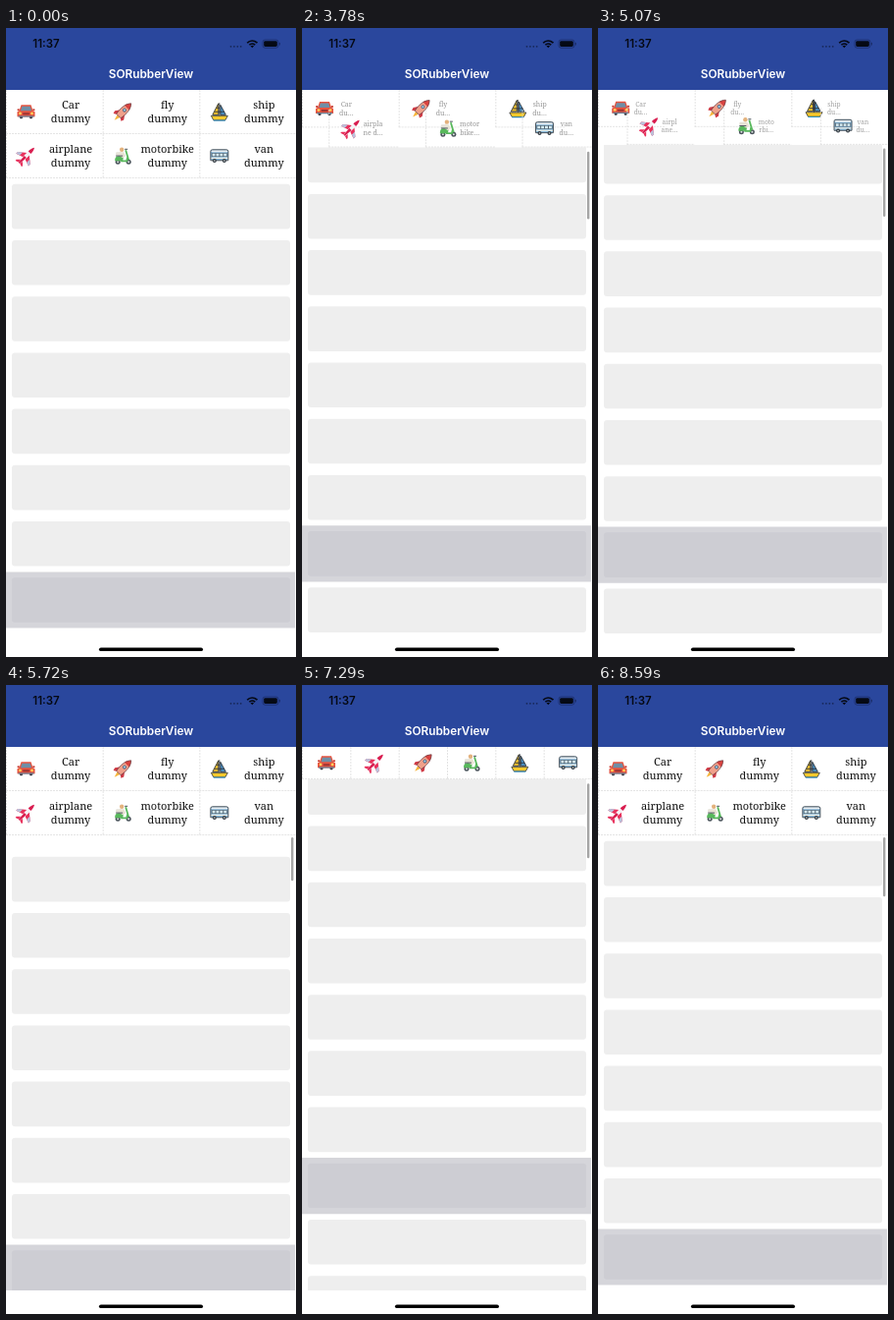
Write an HTML page with a canvas that moves like this. It is 296 px wide and 640 px high and loops after 8690 ms.

```html
<!DOCTYPE html>
<html lang="en">
<head>
<meta charset="utf-8">
<title>SORubberView</title>
<style>
  html, body { margin: 0; width: 100%; height: 100%; overflow: hidden; background: #fff; }
  canvas { display: block; width: 296px; height: 640px; }
</style>
</head>
<body>
<canvas id="stage"></canvas>
<script>
const W = 296, H = 640, LOOP = 8690;
const NAV = 63, OPEN = 90, SHUT = 33, BOTTOM = 616;
const ROW = 57.2, CONTENT = 3560;

const canvas = document.getElementById('stage');
const ctx = canvas.getContext('2d');
const dpr = window.devicePixelRatio || 1;
canvas.width = W * dpr;
canvas.height = H * dpr;

// [time, scroll distance, header collapse 0..1]
const keys = [
  [3200, 0, 0], [3280, 5, .05], [3440, 22, .25], [3610, 31, .36], [3780, 47, .55],
  [3890, 58, .72], [4000, 66, 1], [4300, 74, 1], [4710, 68.5, 1], [4830, 66, 1],
  [4940, 59, .85], [5070, 46, .6], [5300, 16, .2], [5420, 0, 0], [5540, -9, 0],
  [5720, -16, 0], [5840, -15, 0], [6000, -6, 0], [6200, 0, 0], [6270, 0, 0],
  [6380, 17, .18], [6490, 40, .44], [6600, 59, .68], [6680, 61, .72], [6800, 72, 1],
  [7000, 77, 1], [7290, 72.5, 1], [7410, 68, 1], [7520, 58, .8], [7700, 34, .42],
  [7900, 4, 0], [8050, -9, 0], [8200, -6, 0], [8370, 0, 0]
];

function pose(t) {
  const i = keys.findIndex(k => k[0] > t);
  if (i < 1) return [0, 0];
  const a = keys[i - 1], b = keys[i], f = (t - a[0]) / (b[0] - a[0]);
  return [1, 2].map(n => a[n] + (b[n] - a[n]) * f);
}

function rect(x, y, w, h, color, r = 0) {
  ctx.fillStyle = color;
  ctx.beginPath();
  ctx.roundRect(x, y, w, h, r);
  ctx.fill();
}

function fill(color, d) {
  ctx.fillStyle = color;
  ctx.fill(new Path2D(d));
}

function stroke(color, d, width = .8) {
  ctx.strokeStyle = color;
  ctx.lineWidth = width;
  ctx.stroke(new Path2D(d));
}

function disc(x, y, r, color) {
  ctx.fillStyle = color;
  ctx.beginPath();
  ctx.arc(x, y, r, 0, 7);
  ctx.fill();
}

function text(s, x, y, font, color, align = 'center') {
  ctx.font = font;
  ctx.fillStyle = color;
  ctx.textAlign = align;
  ctx.fillText(s, x, y);
}

// Icons fit a box of about 18 px around the origin.
function car() {
  rect(-6.5, 3, 3, 4, '#3c3f4a', 1);
  rect(3.5, 3, 3, 4, '#3c3f4a', 1);
  fill('#e6533f', 'M-5-7H5L7-1 9 0V5H-9V0L-7-1Z');
  fill('#6f8ea6', 'M-4.2-5.5H4.2L5.6-1H-5.6Z');
  rect(-9, -3, 2.4, 2, '#c93c32', 1);
  rect(6.6, -3, 2.4, 2, '#c93c32', 1);
  disc(-6, 1.6, 1.4, '#ffd05a');
  disc(6, 1.6, 1.4, '#ffd05a');
  rect(-3.5, 1, 7, 2, '#9c3434', 1);
  rect(-8, 4, 16, 1.3, '#6b7c91');
}

function rocket() {
  ctx.rotate(Math.PI / 4);
  fill('#f7b53c', 'M-2 6L0 12 2 6Z');
  fill('#cf3a45', 'M-3 0L-6.5 5-5.5 8-2.5 6ZM3 0L6.5 5 5.5 8 2.5 6Z');
  fill('#f0a08a', 'M0-12C4-8 4.5-1 3 6H-3C-4.5-1-4-8 0-12Z');
  fill('#d9423f', 'M0-12C2-10 3-8 3.4-6H-3.4C-3-8-2-10 0-12Z');
  stroke('#69434a', 'M0-12C4-8 4.5-1 3 6H-3C-4.5-1-4-8 0-12Z', .7);
  disc(0, -2.5, 1.9, '#4d5b78');
  disc(0, -2.5, 1.1, '#9fd4ee');
}

function ship() {
  fill('#f2c230', 'M-1-9V3H-7Z');
  fill('#4c93c9', 'M1-7V3H6.5Z');
  stroke('#2b3138', 'M0-9V5M-1-8.5V3H-7ZM1-7V3H6.5ZM-3-4H0M-5 0H5', .9);
  fill('#f6c92c', 'M-8.5 4H8.5L6 8.5H-6Z');
  stroke('#2b3138', 'M-8.5 4H8.5L6 8.5H-6Z', .8);
  stroke('#2f93c4', 'M-6 8.8H6', 1);
}

function plane() {
  ctx.rotate(Math.PI / 4);
  fill('#e8315c', 'M-1.6-3L-9 3V5.5L-1.6 3ZM1.6-3L9 3V5.5L1.6 3Z');
  fill('#b9c4dd', 'M-5-.2L-9 3V5.5L-5 4ZM5-.2L9 3V5.5L5 4Z');
  fill('#e8315c', 'M-1 6L-4.5 9.5V11L0 9.5 4.5 11V9.5L1 6Z');
  fill('#f5f2f6', 'M0-12C2.3-9 2 4 1 10H-1C-2-4-2.3-9 0-12Z');
  fill('#d91d4f', 'M0-12C1.6-10 1.9-7 1.9-5H-1.9C-1.9-7-1.6-10 0-12ZM-1.5 1H1.5L.8 10H-.8Z');
}

function scooter() {
  disc(-5, 6, 2.5, '#4b545c');
  disc(6, 6, 2.5, '#4b545c');
  disc(-5, 6, 1, '#dfe5e2');
  disc(6, 6, 1, '#dfe5e2');
  stroke('#58b85c', 'M3-6L6 4M-2 5H4L5 1', 1.8);
  fill('#58b85c', 'M-8 4C-8 0-5-1 1 0L0 5H-8Z');
  rect(-7, -4, 5.5, 4, '#e5e2d8', 1);
  fill('#e9e3d4', 'M-3-4H1L3 0 0 2-3 0Z');
  disc(-1, -6.5, 2.2, '#e3b27d');
  stroke('#4b545c', 'M2-7H5M-7-.2H0', 1);
}

function van() {
  rect(-9, -6.5, 18, 11, '#87b9dc', 2);
  rect(-8.4, -6, 16.8, 2, '#e9edf0', 1);
  rect(-8, -3, 16, 3.6, '#46545f');
  for (const x of [-7.3, -3.4, .5, 4.4]) rect(x, -2.5, 3, 2.6, '#d4ebf4');
  rect(-9, 1.5, 18, 1.2, '#f3f0e4');
  stroke('#3b444c', 'M-9-5Q-9-6.5-7-6.5H7Q9-6.5 9-5V4.5H-9Z', .9);
  for (const x of [-5, 5]) {
    disc(x, 4.8, 2, '#333b42');
    disc(x, 4.8, .8, '#c9d0d3');
  }
}

const cells = [
  ['Car', car], ['fly', rocket], ['ship', ship],
  ['airplane', plane], ['motorbike', scooter], ['van', van]
];

const fits = (s, width) => ctx.measureText(s).width <= width;

// Two lines, broken between letters when the first word is too wide.
function wrap(word, width) {
  let n = word.length, rest = 'dummy';
  while (n > 1 && !fits(word.slice(0, n), width)) n--;
  if (n < word.length) rest = word.slice(n) + ' dummy';
  let second = rest;
  for (let k = rest.length - 1; k > 0 && !fits(second, width); k--)
    second = rest.slice(0, k).trim() + '…';
  return [word.slice(0, n), second];
}

function drawCell(word, icon, index, p) {
  const col = index % 3, row = index / 3 | 0;
  const w = W / 3 - W / 6 * p, h = 45 - 12 * p;
  ctx.save();
  ctx.translate(col * W / 3 + row * W / 6 * p, NAV + row * 45 * (1 - p));

  ctx.setLineDash([2, 1]);
  stroke('#dedede', `M.5 0V${h}M0 ${h - .5}H${w}`, .8);
  ctx.setLineDash([]);

  const size = 11 - 7.4 * p, width = 58 * (1 - 1.155 * p);
  if (width > 5) {
    const font = `500 ${size}px "Noto Serif", serif`;
    ctx.globalAlpha = 1 - p;
    ctx.font = font;
    wrap(word, width).forEach((line, i) =>
      text(line, 66 - 37.5 * p, h / 2 + size * (i ? .94 : -.28), font, '#111'));
    ctx.globalAlpha = 1;
  }
  ctx.translate(20.5 + 4.5 * p, 22.3 - 6 * p);
  icon();
  ctx.restore();
}

function drawList(scroll, top, pressed) {
  ctx.save();
  ctx.beginPath();
  ctx.rect(0, top, W, BOTTOM - top);
  ctx.clip();
  for (let i = 0; i < 11; i++) {
    const y = 153 + i * ROW - scroll;
    const active = i === 7 || (i === 3 && pressed);
    if (active) rect(0, y, W - 1, ROW, '#d5d5da');
    rect(6, y + 5.8, 284, 45.6, active ? '#cdcdd3' : '#eeeeee', 3);
  }
  ctx.restore();
}

function drawScrollbar(scroll, p, top) {
  const view = BOTTOM - top, offset = scroll - (OPEN - SHUT) * p;
  const y = top + 2 + Math.max(0, offset) * view / CONTENT;
  rect(291, y, 2.4, view * view / CONTENT + Math.min(0, offset), '#a5a5a5', 1.2);
}

function drawBars() {
  rect(0, 0, W, NAV, '#2a479d');
  text('11:37', 41, 20.3, '600 11.5px Inter, sans-serif', '#050914');
  text('SORubberView', 148, 51.3, '600 11.8px Inter, sans-serif', '#fff');
  for (let i = 0; i < 4; i++) disc(229.5 + i * 3.4, 18.8, .9, '#172758');

  ctx.lineCap = 'butt';
  for (const r of [4, 7]) {
    ctx.beginPath();
    ctx.arc(251.3, 20, r, -Math.PI * .76, -Math.PI * .24);
    ctx.lineWidth = 1.7;
    ctx.strokeStyle = '#050914';
    ctx.stroke();
  }
  fill('#050914', 'M251.3 20.2L249.5 18.3Q251.3 17 253.1 18.3Z');

  ctx.strokeStyle = '#1b2d67';
  ctx.lineWidth = .8;
  ctx.beginPath();
  ctx.roundRect(262, 12, 16, 8.2, 2.4);
  ctx.stroke();
  rect(263.2, 13.2, 13.6, 5.8, '#050914', 1.4);
  rect(278.8, 14.8, 1, 2.6, '#1b2d67', .5);
  rect(95, 630.4, 106, 3.7, '#000', 1.9);
}

function draw(now) {
  const t = now % LOOP;
  const [scroll, p] = pose(t);
  const top = NAV + OPEN - (OPEN - SHUT) * p;
  ctx.setTransform(dpr, 0, 0, dpr, 0, 0);
  rect(0, 0, W, H, '#fff');
  drawList(scroll, top, t >= 3140 && t < 3280);
  cells.forEach(([word, icon], i) => drawCell(word, icon, i, p));
  if (t >= 3280) drawScrollbar(scroll, p, top);
  drawBars();
}

const start = performance.now();
function tick() {
  draw(performance.now() - start);
  requestAnimationFrame(tick);
}
tick();
</script>
</body>
</html>
```
